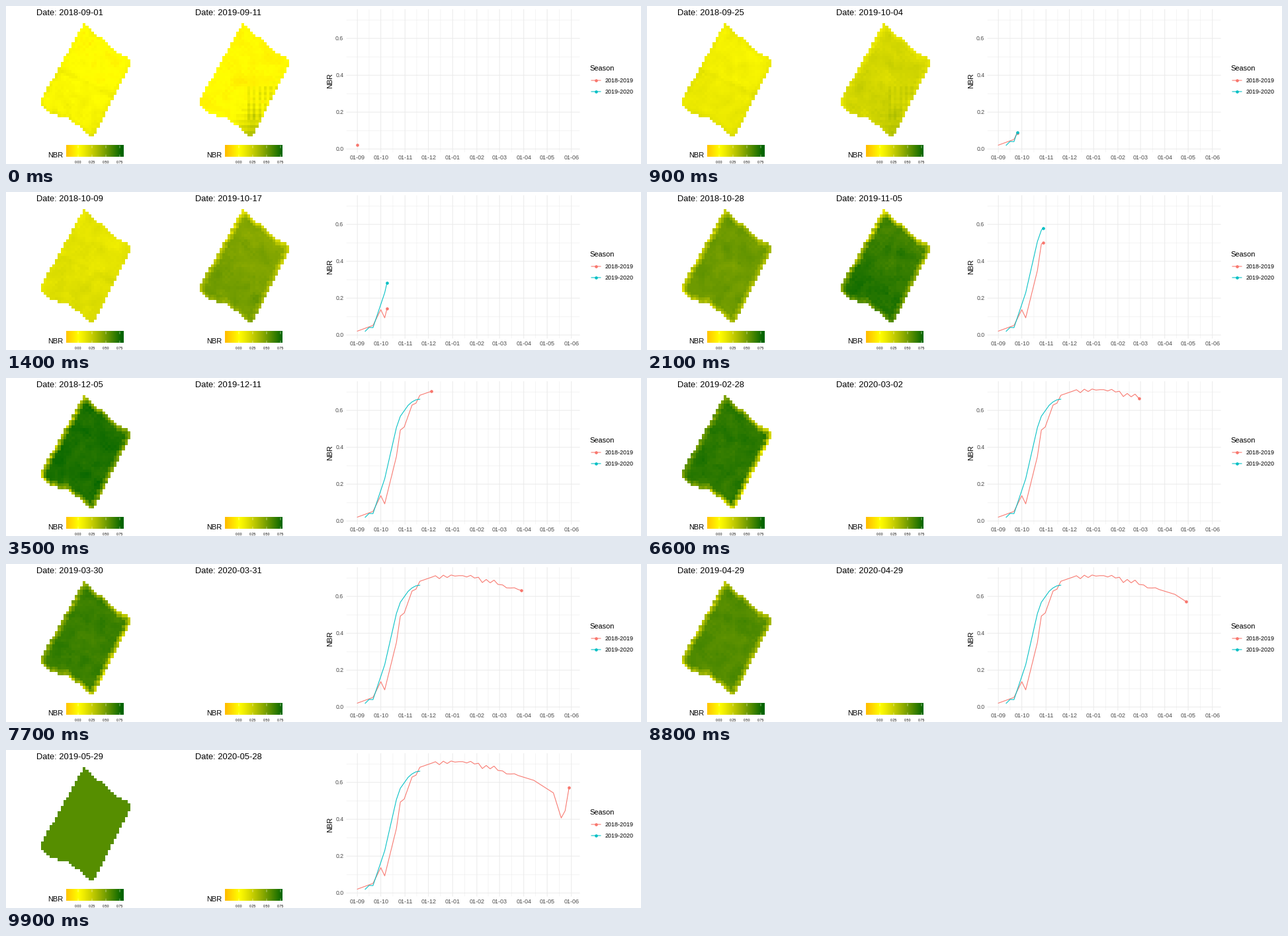
Animation of 960 by 240 pixels, one loop 10 s. Source, as a matplotlib script:

```python
import numpy as np
import matplotlib.pyplot as plt
from matplotlib.animation import FuncAnimation
from matplotlib.colors import ListedColormap
from matplotlib.path import Path

W, H, DPI, FRAMES = 960, 240, 80, 100
LAST = FRAMES - 1
PX = 72 / DPI
ROWS, COLS, CELL = 41, 32, 4.19
X0, Y0 = 53, 26
VMIN, VMAX = -0.23, 0.79
RED, TEAL = "#F8766D", "#00BFC4"
plt.rcParams["font.family"] = "Liberation Sans"


# ---- NBR curves: (days since 1 September, value) ----
def first_season():
    rise = [(0, .021), (20, .052), (30, .1375), (35, .093), (50, .35), (55, .493),
            (60, .51), (70, .629), (75, .639), (80, .682), (95, .704)]
    fall = [(226, .611), (251, .543), (261, .407), (266, .446), (271, .571)]
    # Plateau: slow decline with a beating ripple, one sample every five days
    step = np.arange(22)
    day = 100 + 5 * step + (step > 16)
    trend = np.interp(day, [100, 125, 150, 160, 175, 191, 206],
                      [.703, .713, .707, .684, .681, .648, .642])
    flat = np.c_[day, trend + .009 * np.cos(.92 * np.pi * step)]
    return np.vstack([rise, flat, fall])


def second_season():
    rise = [(10, .02), (15, .041), (20, .04), (35, .229), (50, .507)]
    u = np.array([0, .4, .6, .8, 1])
    return np.vstack([rise, np.c_[55 + 25 * u, .661 - .093 * (1 - u) ** 2]])


S1, S2 = first_season(), second_season()

# ---- colour scale: amber, yellow at zero, dark green ----
levels = np.linspace(VMIN, VMAX, 256)
up, down = np.clip(levels / VMAX, 0, 1), np.clip(levels / VMIN, 0, 1)
cmap = ListedColormap(np.c_[1 - up ** 1.3, 1 - .608 * up - .25 * down, 0 * up])
cmap.set_bad((1, 1, 1, 0))

# ---- field raster ----
xs, ys = np.meshgrid(X0 + CELL * (np.arange(COLS) + .5), Y0 + CELL * (np.arange(ROWS) + .5))
outline = Path([(118, 25), (164, 69), (189, 81), (186, 92), (131, 200), (126, 197),
                (95, 170), (66, 163), (54, 151), (53, 142)])
field = outline.contains_points(np.c_[xs.ravel(), ys.ravel()]).reshape(xs.shape)


def erode(m):
    p = np.pad(m, 1)
    return m & p[:-2, 1:-1] & p[2:, 1:-1] & p[1:-1, :-2] & p[1:-1, 2:]


inner = erode(field)
core = erode(inner)
rng = np.random.default_rng(7)


def noise(passes):
    n = rng.normal(size=xs.shape)
    for _ in range(passes):
        n = (n + sum(np.roll(n, s, a) for s in (-1, 1) for a in (0, 1))) / 5
    return n / n.std()


def blob(x, y, rx, ry):
    return np.exp(-((xs - x) / rx) ** 2 - ((ys - y) / ry) ** 2)


rim = np.where(~inner, 1.0, np.where(~core, .4, 0)) * (1 + .18 * noise(0))
east, south = (xs - 120) / 67, (ys - 112) / 86
patch = noise(3)

# Bare-soil patterns that fade as the crop grows
furrow = np.exp(-((ys - 97 - .487 * (xs - 82)) / 4) ** 2) * (xs > 78) * (xs < 165)
early1 = .05 * rim + .05 * furrow + .05 * south - .045 * blob(155, 98, 28, 24)
odd_col, odd_row = np.arange(COLS) % 2, np.arange(ROWS)[:, None] % 2
stripes = odd_col * ((xs > 118) & (ys > 123) & (ys < 172))
early2 = (-.045 + .34 * blob(132, 200, 24, 32) + .12 * stripes
          + .06 * odd_row * (xs + ys > 272))


def build(series, early, lush, rim_tilt):
    stack = []
    for day, mean in series:
        young = max(0, 1 - mean / .3)
        grown = max(0, mean - .12)
        drop = .58 * rim * np.clip(1 + rim_tilt(day), .2, 2)
        v = mean + young * early + grown * (lush - drop) + .012 * (noise(1) + patch)
        stack.append(np.where(field, v, np.nan))
    return np.array(stack)


def tilt1(day):
    return (np.exp(-((day - 188) / 35) ** 2) - .25) * (east + .5 * south)


maps1 = build(S1, early1, .03, tilt1)
maps1[-1] = np.where(field, S1[-1, 1], np.nan)
maps2 = build(S2, early2, .08 + .12 * south - .06 * east, lambda day: -.5 * south)


def blend(series, maps, day):
    days = series[:, 0]
    i = int(np.clip(np.searchsorted(days, day, "right") - 1, 0, len(days) - 2))
    k = np.clip((day - days[i]) / (days[i + 1] - days[i]), 0, 1)
    return np.ma.masked_invalid(maps[i] * (1 - k) + maps[i + 1] * k)


# ---- stage ----
fig = plt.figure(figsize=(W / DPI, H / DPI), dpi=DPI, facecolor="white")
ax = fig.add_axes([0, 0, 1, 1])
ax.axis("off")


def label(x, y, s, size, color="black", **kw):
    return ax.text(x, y, s, fontsize=size * PX, color=color, **kw)


def line(x, y, color, width=1.07, **kw):
    return ax.plot(x, y, color=color, lw=width * PX, snap=False, **kw)[0]


def marker(x, y, color, size=4.6, **kw):
    return ax.plot(x, y, "o", color=color, ms=size * PX, mew=0, **kw)[0]


def raster(data, x, y, w, h):
    return ax.imshow(data, cmap=cmap, vmin=VMIN, vmax=VMAX, aspect="auto",
                     interpolation="nearest", extent=(x, x + w, y + h, y))


def map_panel(dx, zero, first):
    title = label(45.6 + dx, 14, "", 12.9)
    img = raster(np.ma.masked_invalid(first), X0 + dx, Y0, COLS * CELL, ROWS * CELL)
    left, top, width, height = 91.2 + dx, 212.2, 86.4, 17.3
    raster(np.linspace(left - zero, left + width - zero, 87)[None] / 84, left, top, width, height)
    for v in (0, .25, .5, .75):
        x = zero + 84 * v
        for y in (top, top + .8 * height):
            line([x, x], [y, y + .2 * height], "white", .5)
        label(x, 239, f"{v:.2f}", 5.2, ha="center")
    label(62.8 + dx, 230, "NBR", 11)
    return title, img


def px(day):
    return 531.2 + 1.1808 * day


def py(v):
    return 217.2 - 280 * v


title1, img1 = map_panel(0, 109, maps1[0])
title2, img2 = map_panel(240, 352, maps2[0])

# Chart grid and axes
LEFT, RIGHT, TOP, BOTTOM = 515, 867, 5.5, 222
GRID, GREY = "#EBEBEB", "#4D4D4D"
firsts = np.arange("2019-09", "2020-07", dtype="datetime64[M]").astype("datetime64[D]")
months = (firsts - firsts[0]).astype(int)


def v_rule(day, width):
    line([px(day)] * 2, [TOP, BOTTOM], GRID, width)


def h_rule(v, width):
    line([LEFT, RIGHT], [py(v)] * 2, GRID, width)


for d in (months[1:] + months[:-1]) / 2:
    v_rule(d, .53)
for d, date in zip(months, firsts):
    v_rule(d, 1.07)
    label(px(d) + .2, 233, f"01-{str(date)[5:7]}", 9, GREY, ha="center")
for v in np.arange(0, .8, .2):
    h_rule(v + .1, .53)
    h_rule(v, 1.07)
    label(510.3, py(v) + 2.9, f"{v:.1f}", 8.8, GREY, ha="right")
label(490.3, 113.5, "NBR", 11, rotation=90, ha="center", va="center")

# Legend
label(882.1, 98, "Season", 11)
for y, color, name in ((113, RED, "2018-2019"), (130, TEAL, "2019-2020")):
    line([885, 899], [y, y], color)
    marker(892, y, color)
    label(905.6, y + 3.2, name, 9)

curves = [(s, line([], [], c, zorder=3), marker([], [], c, zorder=4))
          for s, c in ((S1, RED), (S2, TEAL))]
ax.set_xlim(0, W)
ax.set_ylim(H, 0)


def date_text(start, span, f):
    return f"Date: {np.datetime64(start) + span * f // LAST}"


def draw(f):
    f = int(f)
    title1.set_text(date_text("2018-09-01", 270, f))
    title2.set_text(date_text("2019-09-11", 260, f))
    img1.set_data(blend(S1, maps1, 271 * f / LAST))
    day2 = 10 + 260 * f / LAST
    img2.set_visible(day2 <= S2[-1, 0])
    img2.set_data(blend(S2, maps2, day2))

    day = 271 * f // LAST
    for s, path, dot in curves:
        days, vals = s.T
        live = days[0] <= day <= days[-1]
        past = days <= day
        x, y = days[past], vals[past]
        if live:
            now = np.interp(day, days, vals)
            x, y = np.append(x, day), np.append(y, now)
            dot.set_data([px(day)], [py(now)])
        dot.set_visible(bool(live))
        path.set_data(px(x), py(y))
    return []


anim = FuncAnimation(fig, draw, frames=FRAMES, interval=100, repeat=True, repeat_delay=0)
plt.show()
```
